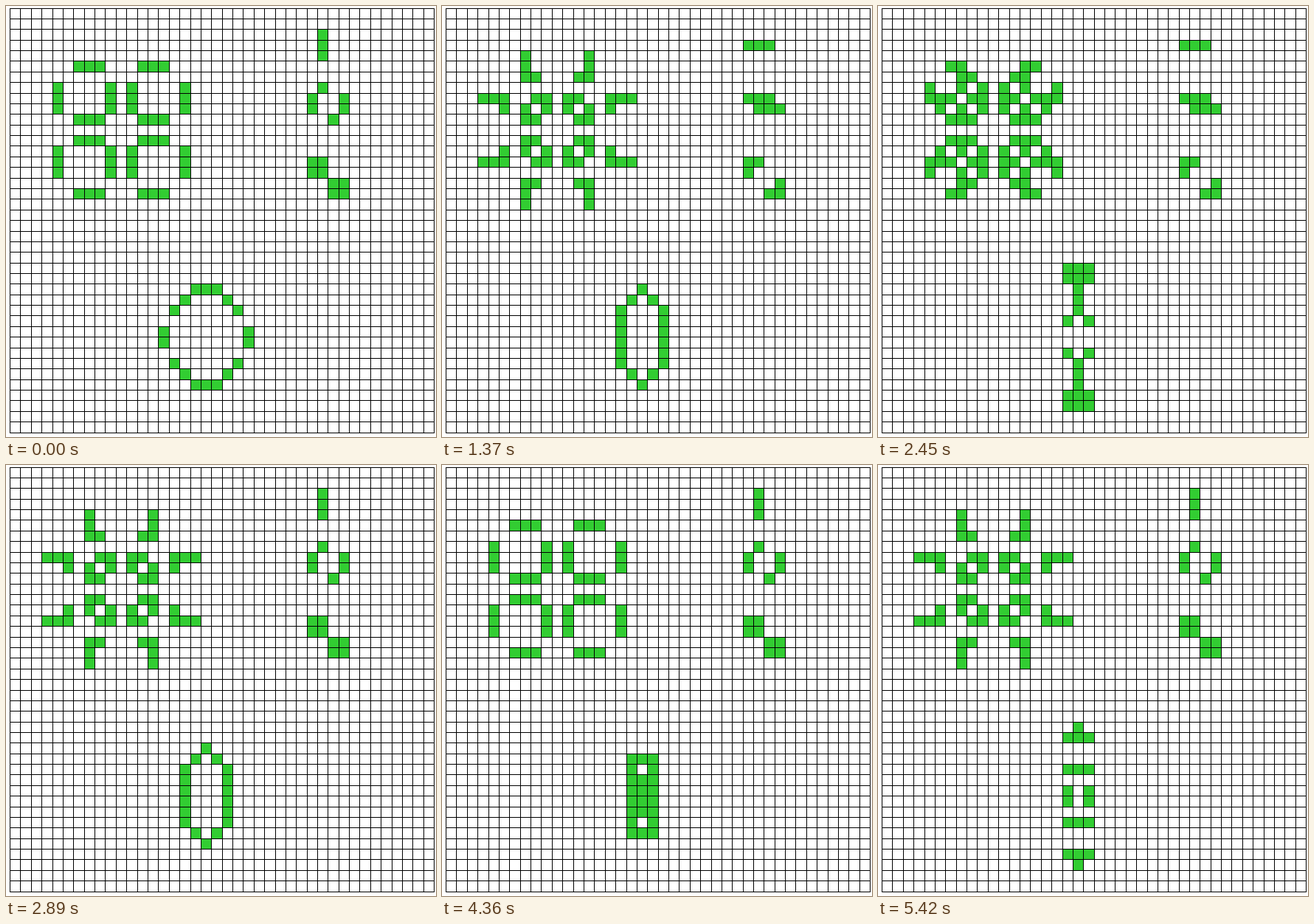
These frames come from a looping animation (583x584 px, 5.44 s). An HTML page with a canvas:

```html
<!DOCTYPE html>
<html lang="en">
<head>
<meta charset="utf-8">
<title>Game of Life oscillators</title>
<style>
  html, body { margin: 0; width: 100%; height: 100%; overflow: hidden; background: #fff; }
  canvas { display: block; }
</style>
</head>
<body>
<canvas id="board" width="583" height="584"></canvas>
<script>
const ctx = document.getElementById('board').getContext('2d');
const SIZE = 40, PITCH = 14.375;
const LOOP = 5440, TICK = 88, PAUSE = 180;

// Generations come in bursts of even ticks, each burst followed by a pause.
const BURSTS = [0, 350, 960, 1370, 1910, 2450, 3070, 3470, 4090, 4710, 5420];

const startTimes = BURSTS.flatMap((start, i) => {
  const span = (BURSTS[i + 1] ?? LOOP + PAUSE) - PAUSE - start;
  const ticks = Math.round(span / TICK);
  const tickStart = n => start + Math.floor(n * span / (ticks || 1) / 10) * 10;
  return Array.from({ length: ticks + 1 }, (_, n) => tickStart(n));
});

// Grid lines snap to whole pixels, spaced a hair unevenly around the middle.
const gridOffset = i => i * PITCH + 0.13 * Math.sin(Math.PI * i / SIZE);
const lineX = col => Math.floor(5.51 + gridOffset(col));
const lineY = row => Math.floor(3 + gridOffset(row));

function firstGeneration() {
  const cells = new Uint8Array(SIZE * SIZE);
  const add = (col, row) => { cells[row * SIZE + col] = 1; };
  const addMirrored = (cx, cy, dx, dy) => {
    for (const sx of [-1, 1])
      for (const sy of [-1, 1]) add(cx + sx * dx, cy + sy * dy);
  };

  // pulsar
  for (const along of [2, 3, 4])
    for (const across of [1, 6]) {
      addMirrored(10, 11, along, across);
      addMirrored(10, 11, across, along);
    }

  // pentadecathlon
  addMirrored(18, 30.5, 0, 4.5);
  addMirrored(18, 30.5, 4, 0.5);
  for (const d of [1, 2, 3]) addMirrored(18, 30.5, d, 5.5 - d);

  // blinker
  for (const row of [2, 3, 4]) add(29, row);

  // toad
  add(29, 7);
  add(30, 10);
  addMirrored(29.5, 8.5, 1.5, 0.5);

  // beacon
  addMirrored(28.5, 14.5, 0.5, 0.5);
  addMirrored(30.5, 16.5, 0.5, 0.5);
  return cells;
}

function nextGeneration(cells) {
  return cells.map((alive, index) => {
    const col = index % SIZE, row = Math.floor(index / SIZE);
    let neighbours = -alive;
    for (let y = Math.max(row - 1, 0); y <= Math.min(row + 1, SIZE - 1); y++)
      for (let x = Math.max(col - 1, 0); x <= Math.min(col + 1, SIZE - 1); x++)
        neighbours += cells[y * SIZE + x];
    return neighbours === 3 || (alive && neighbours === 2) ? 1 : 0;
  });
}

function draw(cells) {
  ctx.fillStyle = '#fff';
  ctx.fillRect(0, 0, 583, 584);

  ctx.fillStyle = '#32cd32';
  cells.forEach((alive, index) => {
    if (!alive) return;
    const col = index % SIZE, row = Math.floor(index / SIZE);
    const x = lineX(col), y = lineY(row);
    ctx.fillRect(x, y, lineX(col + 1) - x, lineY(row + 1) - y);
  });

  ctx.fillStyle = '#000';
  const left = lineX(0), top = lineY(0);
  for (let i = 0; i <= SIZE; i++) {
    ctx.fillRect(lineX(i), top, 1, lineY(SIZE) - top + 1);
    ctx.fillRect(left, lineY(i), lineX(SIZE) - left + 1, 1);
  }
}

const generations = [firstGeneration()];
while (generations.length < startTimes.length)
  generations.push(nextGeneration(generations.at(-1)));

let shown = -1;
function tick() {
  const time = performance.now() % LOOP;
  const current = startTimes.findLastIndex(start => start <= time);
  if (current !== shown) draw(generations[shown = current]);
  requestAnimationFrame(tick);
}
tick();
</script>
</body>
</html>
```
